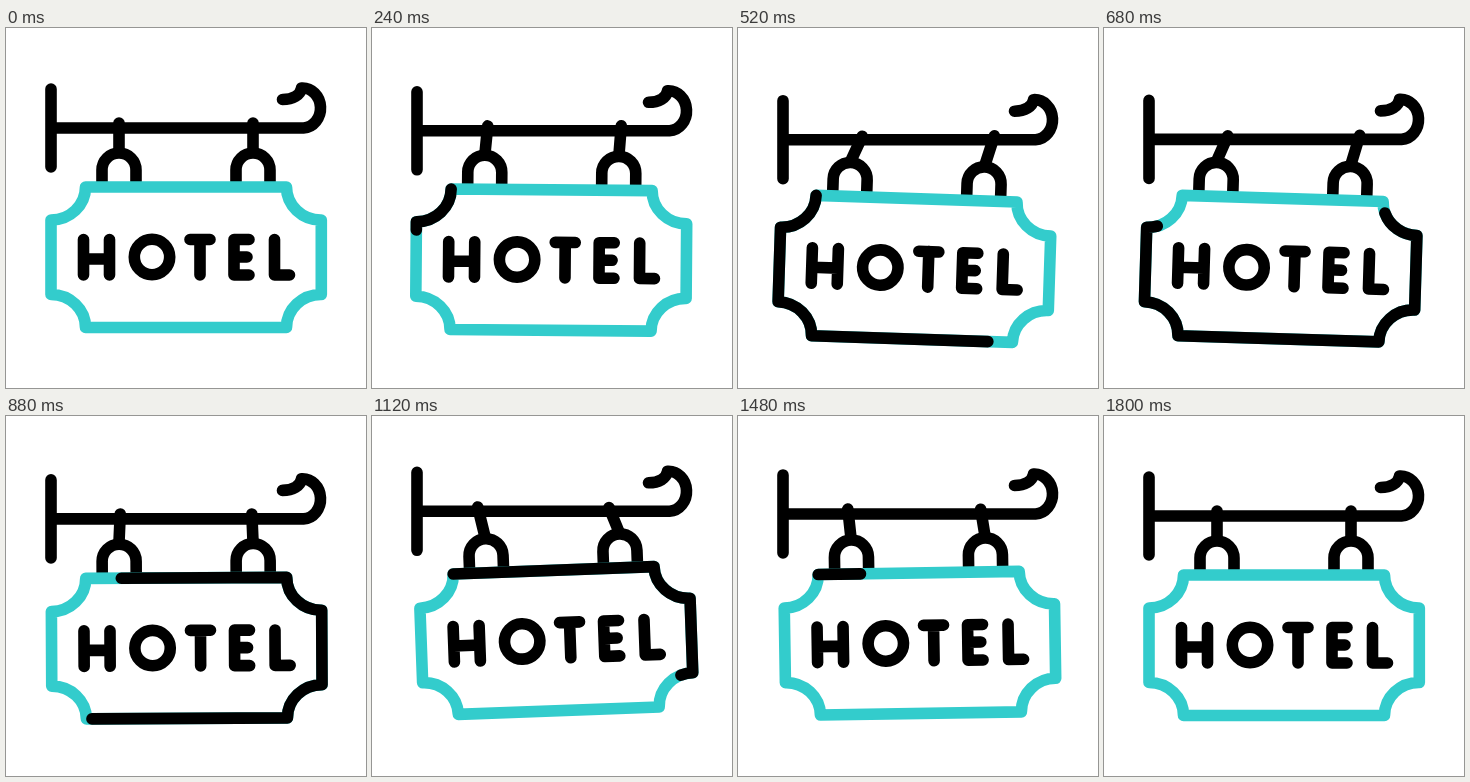
An HTML page that plays this animation: 360x360 px, repeating every 2000 ms.

```html
<!DOCTYPE html>
<html lang="en">
<head>
<meta charset="utf-8">
<title>Swinging hotel sign</title>
<style>
html, body { margin: 0; height: 100%; overflow: hidden; background: #fff; }
svg { display: block; width: 100vw; height: 100vh; }
path, circle { fill: none; stroke: #000; stroke-width: 11.6; stroke-linecap: round; stroke-linejoin: round; }
#frame { stroke: #33cccc; }
</style>
</head>
<body>
<svg viewBox="0 0 360 360" role="img" aria-label="HOTEL">
  <g id="bracket">
    <path d="M45 61V139M45 100H297.5A18 20 0 0 0 295.5 60C294.5 67 287 71.5 276.5 71.5"/>
  </g>
  <path id="pinLeft"/>
  <path id="pinRight"/>
  <g id="sign">
    <path d="M96 157V142a17 17 0 0 1 34 0V157M230 157V142a17 17 0 0 1 34 0V157"/>
    <path id="frame"/>
    <path id="trace" pathLength="1"/>
    <path d="M77.5 211.5V247M103.5 211.5V247M77.5 231H103.5"/>
    <circle cx="146" cy="229" r="17.7"/>
    <path d="M184 211.5H204M194 211.5V247"/>
    <path d="M243 211.5H228V247H243M228 229H241"/>
    <path d="M268.5 211.5V247H283.5"/>
  </g>
</svg>
<script>
const LOOP = 2000, STEP = 40, MOVE_FROM = 120, MOVE_TO = 1800;
const $ = id => document.getElementById(id);

// Runs counter-clockwise from the top left corner
const outline = 'M79.5 159A34.5 33 0 0 1 45 192V266.5A34.5 33 0 0 1 79.5 299.5H280.5' +
  'A34.5 33 0 0 1 315.3 266.5V192A34.5 33 0 0 1 280.5 159H79.5';
$('frame').setAttribute('d', outline);
$('trace').setAttribute('d', outline);

const SWING_TIMES = [80, 600, 1120, 1780];
const LIFT = [0, 12.5, -4.7, 0];
const TILT = [0, 2, -2.1, 0];
const LEAN_LEFT = [0, 12, -7.3, 0];
const LEAN_RIGHT = [0, 10, -10, 0];

const ease = (t, from, to) => {
  const p = Math.min(1, Math.max(0, (t - from) / (to - from)));
  return p * p * (3 - 2 * p);
};

const swing = (t, values) => values.slice(1).reduce(
  (sum, v, i) => sum + (v - values[i]) * ease(t, SWING_TIMES[i], SWING_TIMES[i + 1]), 0);

function setPin(id, x, lean, lift, tilt) {
  const a = tilt * Math.PI / 180;
  const footY = 123 + lift + (x - 180) * Math.sin(a);
  $(id).setAttribute('d', `M${x + lean} ${95 + lift + lean * lean / 80}L${x} ${footY}`);
}

function draw(t) {
  const lift = swing(t, LIFT), tilt = swing(t, TILT);
  $('bracket').setAttribute('transform', `translate(0 ${lift})`);
  $('sign').setAttribute('transform', `translate(0 ${lift}) rotate(${tilt} 180 115)`);
  setPin('pinLeft', 113, swing(t, LEAN_LEFT), lift, tilt);
  setPin('pinRight', 247, swing(t, LEAN_RIGHT), lift, tilt);

  const start = ease(t, 520, 1640), end = ease(t, 80, 1000);
  const trace = $('trace').style;
  trace.display = end > 0 && start < 1 ? '' : 'none';
  trace.strokeDasharray = `${end - start} 2`;
  trace.strokeDashoffset = -start;
}

const origin = performance.now();
function tick() {
  const now = (performance.now() - origin) % LOOP;
  const t = Math.floor(now / STEP) * STEP;
  draw(t < MOVE_FROM || t >= MOVE_TO ? 0 : t);
  requestAnimationFrame(tick);
}
tick();
</script>
</body>
</html>
```
